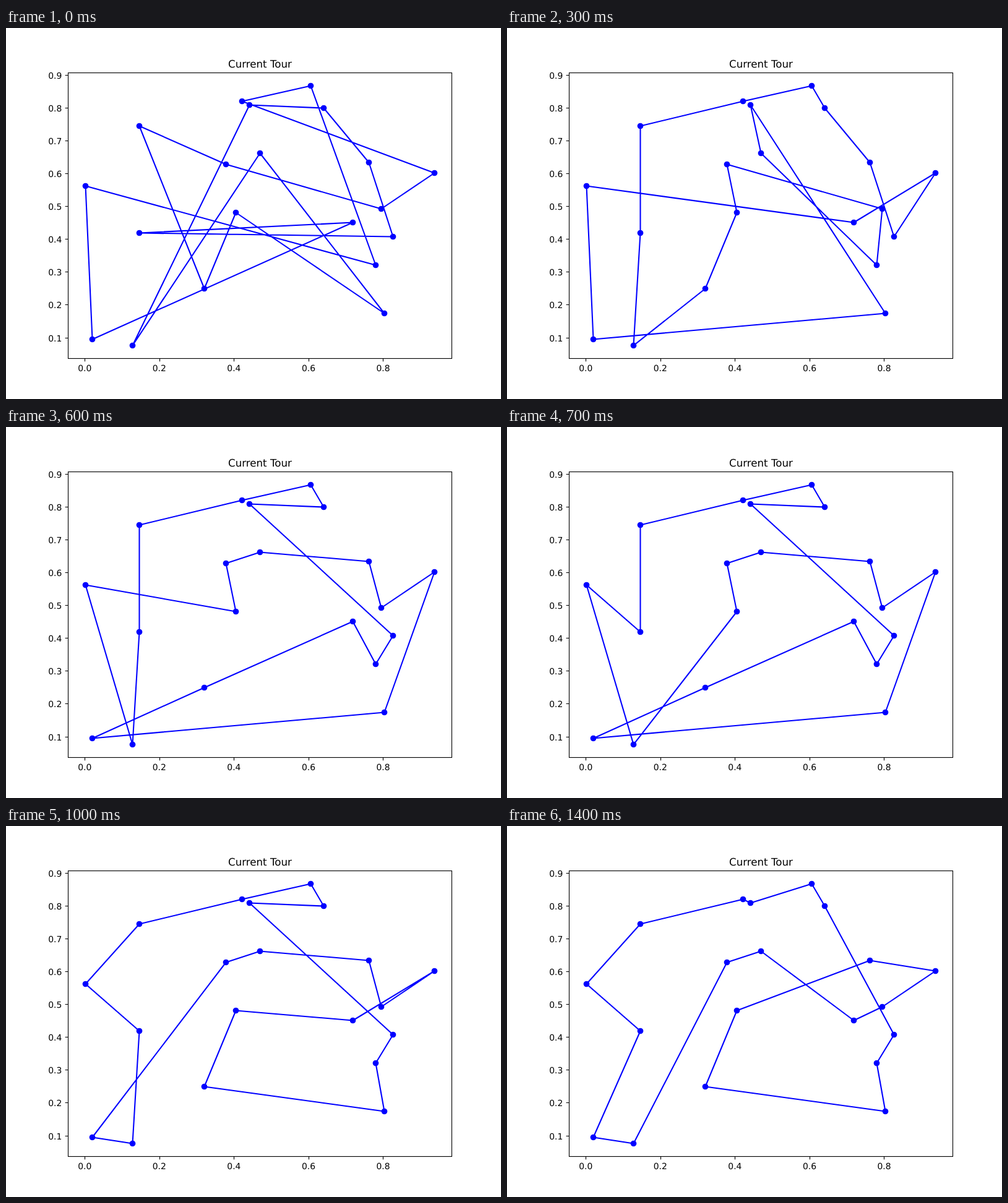
An HTML page that plays this animation: 800x600 px, repeating every 1.5 s.

```html
<!DOCTYPE html>
<html lang="en">
<head>
<meta charset="utf-8">
<title>Current Tour</title>
<style>
  html, body { margin: 0; width: 100%; height: 100%; overflow: hidden; background: #fff; }
  svg { display: block; width: 800px; height: 600px; }
  text { font: 13.89px "DejaVu Sans", sans-serif; text-rendering: geometricPrecision; }
  .title { font-size: 16.67px; text-anchor: middle; }
  .x { text-anchor: middle; }
  .y { text-anchor: end; }
  #axes { fill: none; stroke: #000; stroke-width: 1.11; }
  #tour { fill: none; stroke: #00f; stroke-width: 2.08; stroke-linejoin: round; }
  #cities { fill: #00f; }
</style>
</head>
<body>
<svg viewBox="0 0 800 600">
  <g id="axes"><rect x="100.5" y="72.5" width="620" height="462"/></g>
  <g id="labels"><text class="title" x="410.5" y="64">Current Tour</text></g>
  <g transform="translate(.5 .5)">
    <polygon id="tour"/>
    <g id="cities"></g>
  </g>
</svg>
<script>
const STEP = 100;

const cities = {
  A: [128, 255], B: [139, 503], C: [215, 331], D: [215, 158], E: [204, 513],
  F: [320, 421], G: [355, 220], H: [371, 298], I: [381, 118], J: [393, 124],
  K: [410, 202], L: [492, 93], M: [513, 129], N: [586, 217], O: [560, 314],
  P: [606, 292], Q: [625, 337], R: [597, 383], S: [611, 461], T: [692, 234]
};

// Two opening tours, then the city swaps made at each later step.
const tours = ["ILRABOCQNMJEKSHFDGPT", "ABCLDRPGEFHSKIJMNQTO"];
const moves = ["CS EH", "LJ DK", "RN RT", "TJ", "KP FA", "AE", "BH", "AC",
  "SO", "NO", "MJ", "LJ LM", "LM BE"];

const swap = (tour, [a, b]) =>
  [...tour].map(c => c === a ? b : c === b ? a : c).join("");

for (const m of moves) tours.push(m.split(" ").reduce(swap, tours[tours.length - 1]));

const $ = id => document.getElementById(id);

function add(parent, tag, attrs, text = "") {
  const el = document.createElementNS("http://www.w3.org/2000/svg", tag);
  for (const k in attrs) el.setAttribute(k, attrs[k]);
  el.textContent = text;
  $(parent).append(el);
}

for (let i = 0; i < 5; i++) {
  const x = 127 + 120.6 * i;
  add("axes", "path", { d: `M${Math.round(x) + 0.5} 534.5v4.86` });
  add("labels", "text", { class: "x", x: x + 0.2, y: 555 }, (i * 0.2).toFixed(1));
}
for (let i = 0; i < 9; i++) {
  const y = Math.round(76.1 + 53.055 * i);
  add("axes", "path", { d: `M100.5 ${y + 0.5}h-4.86` });
  add("labels", "text", { class: "y", x: 90.3, y: y + 5.5 }, (0.9 - i * 0.1).toFixed(1));
}
for (const [cx, cy] of Object.values(cities)) add("cities", "circle", { cx, cy, r: 4.86 });

const paths = tours.map(t => [...t].map(c => cities[c].join()).join(" "));
const start = performance.now();

function draw(now) {
  const i = Math.floor(Math.max(0, now - start) / STEP) % paths.length;
  $("tour").setAttribute("points", paths[i]);
  requestAnimationFrame(draw);
}
draw(start);
</script>
</body>
</html>
```
